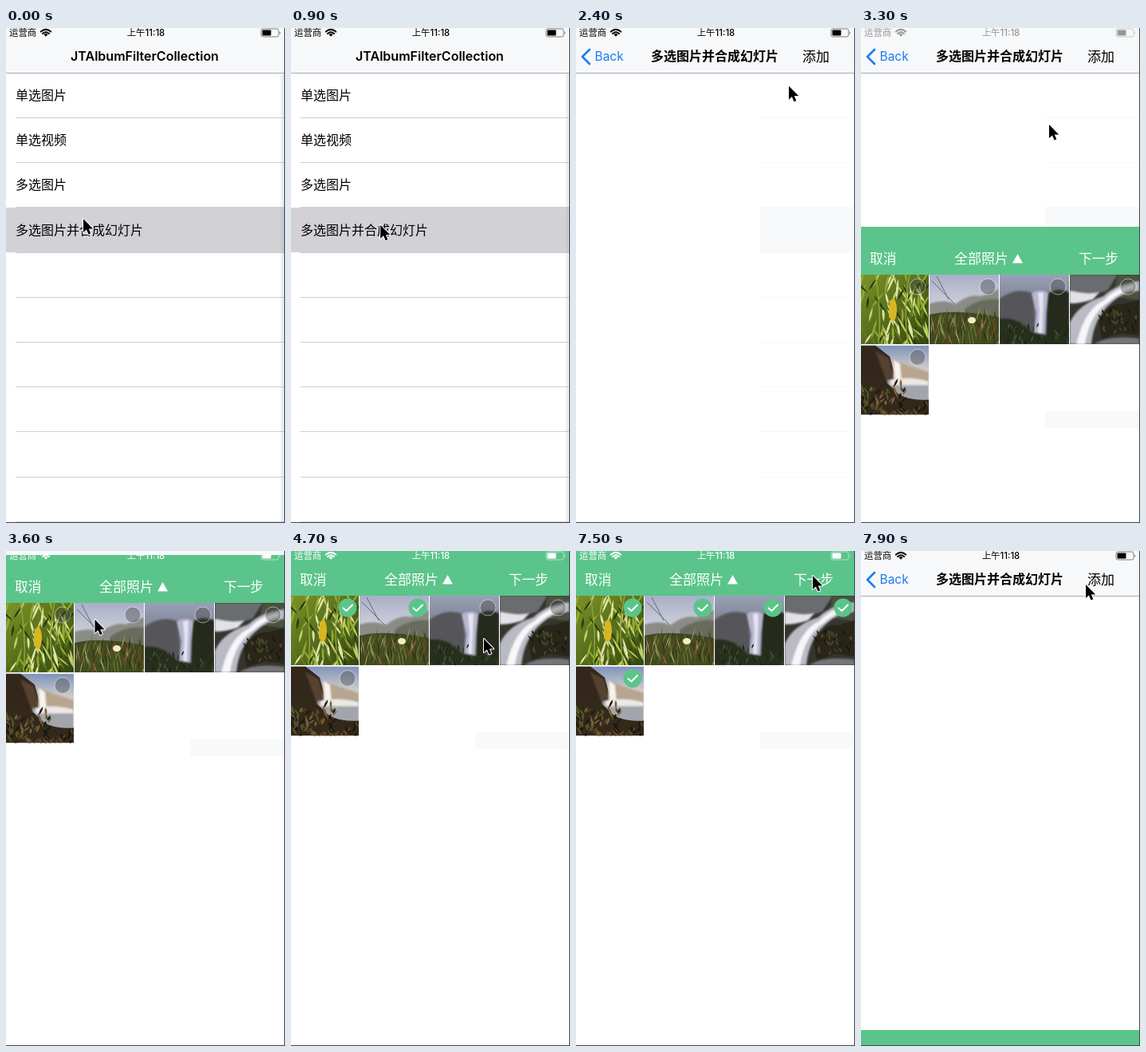
Recreate the animation shown at these times as an HTML page. Size 350 px wide and 620 px high, loop 8 s.

```html
<!DOCTYPE html>
<html lang="zh-CN">
<head>
<meta charset="utf-8">
<style>
  html, body { margin: 0; width: 100%; height: 100%; overflow: hidden; background: #fff; }
  #stage { display: block; font: 16px Inter, "Noto Sans CJK SC", "Noto Sans CJK", sans-serif; }
  .title { font-weight: 600; text-anchor: middle; }
  .crisp { shape-rendering: crispEdges; }
  .line { fill: none; stroke-linecap: round; stroke-linejoin: round; }
</style>
</head>
<body>
<svg id="stage" width="350" height="620" viewBox="0 0 350 620">
  <defs>
    <filter id="soft"><feGaussianBlur stdDeviation="1.3"/></filter>
    <linearGradient id="edge">
      <stop offset="0" stop-color="#8fa6b0" stop-opacity="0"/>
      <stop offset="1" stop-color="#8fa6b0" stop-opacity=".35"/>
    </linearGradient>
    <linearGradient id="leafy" x2="1" y2="1">
      <stop offset="0" stop-color="#7c9428"/><stop offset="1" stop-color="#34460f"/>
    </linearGradient>
    <linearGradient id="haze" x2="0" y2="1">
      <stop offset="0" stop-color="#a9aec6"/><stop offset=".6" stop-color="#d9dce2"/>
    </linearGradient>
    <linearGradient id="dusk" x2="0" y2="1">
      <stop offset="0" stop-color="#99a0b6"/><stop offset="1" stop-color="#55545f"/>
    </linearGradient>
    <linearGradient id="dawn" x2="0" y2="1">
      <stop offset="0" stop-color="#7f93ba"/><stop offset=".5" stop-color="#f4e8d6"/>
    </linearGradient>
  </defs>

  <g id="list"></g>
  <rect id="dim" y="57" width="350" height="563" fill="#1b3a42"/>
  <g id="page">
    <rect x="-7" y="57" width="7" height="563" fill="url(#edge)"/>
    <rect y="57" width="350" height="563" fill="#fff"/>
  </g>
  <g id="ghost" class="crisp"></g>

  <rect width="350" height="56" fill="#f7f8fa"/>
  <rect y="56" width="350" height="1" fill="#a9a9b9"/>
  <text id="oldTitle" class="title" x="174" y="41">JTAlbumFilterCollection</text>
  <text id="newTitle" class="title" x="174" y="41">多选图片并合成幻灯片</text>
  <path id="chevron" class="line" d="M17 27L8 36L17 45" stroke="#1b7cf2" stroke-width="2.6"/>
  <text id="back" x="23.5" y="41" font-size="15.5" fill="#1b7cf2">Back</text>
  <text id="add" x="284" y="42" font-size="17">添加</text>

  <g id="picker">
    <rect y="56" width="350" height="564" fill="#fff"/>
    <rect x="231" y="227" width="118" height="21" fill="#f8f9fb"/>
    <rect y="-4" width="350" height="60" fill="#5bc48a"/>
    <g fill="#fff" font-size="16.7">
      <text x="11" y="42">取消</text>
      <text x="117" y="42" font-size="17">全部照片</text>
      <path d="M190 41.5H203L196.5 30Z"/>
      <text x="273" y="42">下一步</text>
    </g>
    <g id="photos"></g>
  </g>

  <g id="status" fill="currentColor" font-size="11.4">
    <text x="4" y="10">运营商</text>
    <g class="line" stroke="currentColor" stroke-width="2" stroke-linecap="butt">
      <path d="M43.8 4.6Q50 -.9 56.2 4.6M46 7Q50 3.5 54 7"/>
    </g>
    <path d="M47.4 8Q50 6 52.6 8L50 10.8Z"/>
    <text x="175.5" y="10" font-weight="500" text-anchor="middle">上午11:18</text>
    <rect x="320" y="1" width="22" height="10" rx="2.5" fill="none" stroke="currentColor" stroke-opacity=".5"/>
    <rect x="321.5" y="2.5" width="11" height="7" rx="1"/>
    <path d="M343.3 4.2Q345.3 6 343.3 7.8Z" opacity=".6"/>
  </g>

  <path class="crisp" d="M349 0H350V620H0V619H349Z" fill="#45434d"/>
  <path id="cursor" d="M0 0V17L3.9 13.4L6.5 19.5L9.3 18.3L6.8 12.4H12.2Z"
        stroke="#fff" stroke-width="2" stroke-linejoin="round" paint-order="stroke"/>
</svg>
<script>
const $ = id => document.getElementById(id);
let seed = 11;
const rnd = (a, b) => a + (b - a) * ((seed = seed * 16807 % 2147483647) / 2147483647);
const rect = (x, y, w, h, fill) => `<rect x="${x}" y="${y}" width="${w}" height="${h}" fill="${fill}"/>`;
const shape = (d, fill, extra = '') => `<path d="${d}" fill="${fill}" ${extra}/>`;
const soft = 'filter="url(#soft)"';

// Tapered leaves scattered over a box
function leaves(n, [x0, y0, x1, y1], length, width, lean, colors) {
  let out = '';
  for (let i = 0; i < n; i++) {
    const x = rnd(x0, x1), y = rnd(y0, y1), l = rnd(length * .5, length), s = rnd(-lean, lean);
    out += shape(`M${x} ${y}q${s / 2 - width} ${-l / 2} ${s} ${-l}q${width - s / 2} ${l / 2} ${-s} ${l}`,
      colors[i % colors.length]);
  }
  return out;
}

const scenes = [
  () => rect(0, 0, 87, 87, 'url(#leafy)') +
    leaves(110, [0, 8, 87, 100], 27, 3, 16, ['#2a3a0c', '#91aa32', '#c2cf66', '#5d7a1c', '#e0e4a4']) +
    shape('M20 0Q28 45 24 87M63 0Q54 40 61 87', 'none', 'stroke="#8da53a" stroke-width="1.5"') +
    '<ellipse cx="42" cy="44" rx="5" ry="14" fill="#d8b622"/>',
  () => rect(0, 0, 87, 87, 'url(#haze)') +
    shape('M0 36Q20 30 32 37Q52 23 64 27L87 18V87H0Z', '#8b8c87', soft) +
    shape('M45 42Q65 28 87 31V60H45Z', '#676c5c', soft) +
    shape('M0 50Q30 42 87 53V87H0Z', '#40491f') +
    leaves(95, [0, 58, 87, 94], 27, 1.3, 10, ['#263313', '#718238', '#84472f', '#a5a365', '#4c602a']) +
    shape('M3 8L32 37M9 2L24 31', 'none', 'stroke="#515361" stroke-width=".8"') +
    '<ellipse cx="53" cy="57" rx="5" ry="4" fill="#f2efc5"/>',
  () => rect(0, 0, 87, 87, 'url(#dusk)') +
    shape('M0 30Q20 15 42 23L46 87H0Z', '#56565a', soft) +
    shape('M60 24Q72 15 87 22V87H58Z', '#25291f', soft) +
    shape('M40 23Q50 17 61 23L58 47L57 80H42L46 48Z', '#b7b6cf', soft) +
    shape('M48 23L55 22L53 74L48 76L50 45Z', '#e6e6f2', soft) +
    shape('M0 55Q24 53 40 72L62 76L87 65V87H0Z', '#252d1c', soft) +
    leaves(30, [0, 65, 87, 92], 10, 2, 5, ['#39452a', '#1a2017', '#4c5139']),
  () => rect(0, 0, 87, 87, '#34352d') +
    shape('M0 0H60L47 20L0 34Z', '#6b6d70', soft) +
    shape('M60 0H87V32L55 27Z', '#4c5340', soft) +
    shape('M87 8Q57 12 42 27Q10 37 0 60V87H27Q30 54 52 35Q65 22 87 20Z', '#b9bac4', soft) +
    shape('M80 12Q56 17 43 32Q19 42 8 87H19Q25 49 49 34Q64 21 80 17Z', '#f7f7fa', soft) +
    shape('M0 20Q22 25 37 22L29 31Q14 36 0 36Z', '#e1e1e7', soft) +
    shape('M36 58Q48 35 67 37L87 31V76L63 73L40 81Z', '#292619') +
    leaves(35, [42, 45, 87, 75], 9, 2, 7, ['#465029', '#17160f', '#5b4c32']) +
    shape('M30 87Q49 75 87 80V87Z', '#77747c', soft),
  () => rect(0, 0, 87, 87, 'url(#dawn)') +
    shape('M0 0H20L38 14L46 43L39 55H0Z', '#33271c') +
    shape('M20 7L37 16L43 40L34 45Z', '#574232', soft) +
    shape('M43 18Q59 25 87 33V49H42Z', '#b8a58f', soft) +
    shape('M43 18L51 23L53 45H44Z', '#f7f3ee', soft) +
    shape('M35 43H87V70H35Z', '#a3a5ac', soft) +
    shape('M39 43Q62 38 87 45V50H39Z', '#eee8e4', soft) +
    shape('M0 40Q24 35 42 54Q54 70 87 68V87H0Z', '#33291a') +
    leaves(60, [0, 52, 55, 92], 11, 3, 8, ['#60482a', '#1b1810', '#515727', '#80633b']) +
    leaves(20, [45, 75, 87, 92], 9, 3, 7, ['#5d452a', '#19150f'])
];

const rowY = i => Math.floor(56.2 * i);
const rows = [2, 3, 4, 5, 6, 7, 8, 9, 10, 11].map(rowY);
$('list').innerHTML = rect(0, 57, 350, 563, '#fff') +
  rows.map(y => rect(12, y, 338, 1, '#cacdd3')).join('') +
  rect(0, 225, 350, 56, '#d2d2d6') +
  ['单选图片', '单选视频', '多选图片', '多选图片并合成幻灯片']
    .map((s, i) => `<text x="12" y="${90 + 56.2 * i}">${s}</text>`).join('');
$('ghost').innerHTML = rect(231, 225, 118, 56, '#f8f9fb') +
  rows.map(y => rect(231, y, 118, 1, '#f8f8fa')).join('');

$('photos').innerHTML = scenes.map((draw, i) => `
  <svg x="${i % 4 * 88 - 2}" y="${i < 4 ? 56 : 144.5}" width="87" height="87">${draw()}
    <circle cx="73" cy="15" r="10" fill="#444" fill-opacity=".4" stroke="#fff" stroke-opacity=".5"/>
    <g class="tick"><circle cx="73" cy="15" r="11.5" fill="#5bc48a"/>
    <path class="line" d="M67.5 15.5L71.5 19L79 11.5" stroke="#fff" stroke-width="2"/></g>
  </svg>`).join('');
const ticks = document.querySelectorAll('.tick');
const tickTimes = [3900, 4300, 5000, 5500, 6600];

// Keys are [time, value, value...]
function at(keys, t) {
  const i = keys.findIndex(k => k[0] > t);
  if (i < 0) return keys[keys.length - 1].slice(1);
  if (!i) return keys[0].slice(1);
  const a = keys[i - 1], b = keys[i], u = (t - a[0]) / (b[0] - a[0]);
  return a.slice(1).map((v, j) => v + (b[j + 1] - v) * u);
}
const push = [[1300, 0], [1400, .34], [1500, .757], [1600, .92], [1700, .98], [1800, 1]];
const present = [[3100, 0], [3200, .17], [3300, .592], [3400, .86], [3500, .95], [3600, .985], [3700, 1],
  [7500, 1], [7600, .72], [7700, .3], [7800, .09], [7900, .026]];
const pointer = [[0, 97, 239], [500, 99, 241], [1200, 122, 251], [1900, 122, 251], [2500, 296, 37],
  [2900, 296, 37], [3300, 236, 121], [3700, 70, 74], [3900, 70, 72], [4200, 158, 72], [4400, 158, 72],
  [4700, 242, 110], [4900, 246, 72], [5100, 246, 72], [5400, 333, 72], [5600, 333, 72],
  [6200, 62, 187], [6500, 70, 160], [6700, 70, 160], [7300, 297, 31], [7500, 297, 31], [7900, 282, 42]];

const move = (id, x, y = 0) => $(id).setAttribute('transform', `translate(${x} ${y})`);
const fade = (id, v) => $(id).setAttribute('opacity', v);

function draw(now) {
  const t = Math.floor(now % 8000 / 100) * 100;
  const [p] = at(push, t), [m] = at(present, t), q = 1 - p;

  move('list', -105 * p);
  fade('dim', .12 * p);
  move('page', 350 * q);
  fade('ghost', t >= 1400 && t < 7500 ? 1 : 0);

  move('oldTitle', -120 * p);
  fade('oldTitle', Math.sqrt(q));
  move('newTitle', 206 * q);
  fade('newTitle', p);
  move('back', 152 * q);
  fade('back', p);
  fade('chevron', Math.min(1, p * 1.4));
  fade('add', Math.min(1, p * 1.3));

  move('picker', 0, m ? Math.round(620 * (1 - m)) : 640);
  const c = Math.round(255 * m);
  $('status').style.color = `rgb(${c},${c},${c})`;
  ticks.forEach((g, i) => g.setAttribute('opacity', t >= tickTimes[i] ? 1 : 0));
  move('cursor', ...at(pointer, t));
  requestAnimationFrame(() => draw(performance.now()));
}
draw(0);
</script>
</body>
</html>
```
